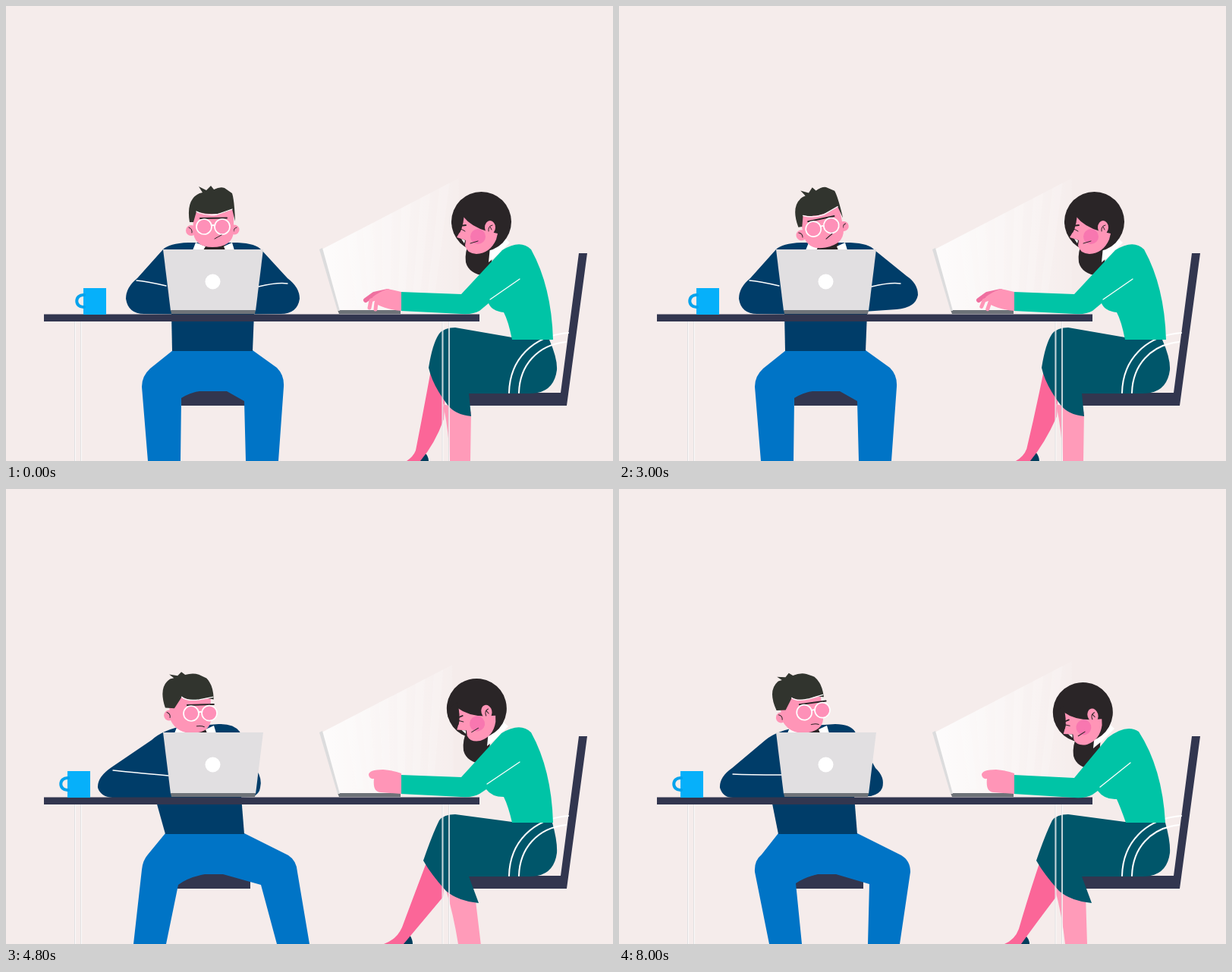
Write an HTML page that moves like this. It is 800 px wide and 600 px high and loops after 8.08 s.

```html
<!DOCTYPE html>
<html lang="en">
<head>
<meta charset="utf-8">
<title>Two people at a desk</title>
<style>
html, body { margin: 0; width: 100%; height: 100%; overflow: hidden; background: #f5eceb; }
svg { display: block; width: 100vw; height: 100vh; }
.line { fill: none; stroke-linecap: round; stroke-linejoin: round; }
.white { stroke: #fff; }
.ink { stroke: #2a2527; }
.wood { fill: #32364f; }
.navy { fill: #003d69; }
.skin { fill: #ff95b7; }
.green { fill: #00c4a6; }
.hair { fill: #2a2527; }
.metal { fill: #6e7379; }
</style>
</head>
<body>
<svg viewBox="0 0 800 600">
  <defs>
    <linearGradient id="glow" gradientUnits="userSpaceOnUse" x1="416" y1="0" x2="600" y2="0">
      <stop offset="0" stop-color="#fff" stop-opacity=".85"/>
      <stop offset=".45" stop-color="#fff" stop-opacity=".5"/>
      <stop offset="1" stop-color="#fff" stop-opacity=".08"/>
    </linearGradient>
  </defs>

  <!-- man -->
  <path id="stool" class="wood"/>
  <path id="trousers" fill="#0074c6"/>
  <path id="waist" class="navy"/>
  <path id="manLeft" class="navy"/>
  <path id="manRight" class="navy"/>
  <path id="cuffLeft" class="line white" stroke-width="1.3"/>
  <path id="cuffRight" class="line white" stroke-width="1.3"/>
  <g id="manCollar">
    <path class="hair" d="M258 312H289V322H258Z"/>
    <path fill="#fff" d="M250 312L263 317L260 322H246ZM298 312L287 317L289 322H301Z"/>
  </g>
  <g id="manHead">
    <g id="earRight"><circle class="skin" cx="301" cy="295" r="6.5"/>
      <path class="line ink" d="M300 297Q300 293 304 292"/></g>
    <path id="manFace" class="skin"/>
    <circle class="skin" cx="244" cy="296" r="7"/>
    <path class="line ink" d="M245 299Q246 294 241 292"/>
    <path id="manHair" fill="#31342e"/>
    <path id="fringe" class="line white" stroke-width="1.3"/>
    <g id="features" class="line">
      <path class="ink" stroke-width="2" d="M256 280L291 279.500"/>
      <circle class="white" fill="#fe90b8" stroke-width="1.7" cx="261" cy="291" r="10"/>
      <circle class="white" fill="#fe90b8" stroke-width="1.7" cx="285" cy="291" r="10"/>
      <path class="white" stroke-width="1.700" d="M271 290Q273 288 275 290"/>
      <path id="manMouth" class="ink" stroke-width="1"/>
    </g>
  </g>

  <!-- screen glow -->
  <path id="beam" fill="url(#glow)"/>
  <g id="streaks" fill="#fff" opacity=".18"></g>

  <!-- woman -->
  <g id="chair" class="wood"><path d="M755 326H766L739 527H610V510H731Z"/></g>
  <path id="shoe" fill="#003d5c"/>
  <path id="farLeg" fill="#fb6698"/>
  <path id="nearLeg" fill="#ff9bb9"/>
  <path id="skirt" fill="#00566a"/>
  <g id="arms" class="line white" stroke-width="2">
    <path d="M663 510C664 466 694 435 741 431M676 510C677 474 700 447 738 443"/>
  </g>
  <path id="ponytail" class="hair" d="M612 308Q604 324 606 338Q610 353 631 356L640 340L642 310Z"/>
  <path id="neck" fill="#fff" d="M636 338L638 318L654 303L664 312L648 328Z"/>
  <g id="womanHead">
    <circle class="hair" cx="626.500" cy="284.500" r="39.500"/>
    <path class="skin" d="M602 277Q613 291 634 297L648 300L646 308Q638 326 620 327Q607 326 605 316L606 309L594 305L600 295Z"/>
    <path class="hair" d="M604 270Q604 287 598 299Q590 297 587 286Q589 273 604 270Z"/>
    <ellipse class="skin" cx="638" cy="292" rx="7" ry="9"/>
    <path class="line ink" d="M636 297Q635 290 641 289M638 291L640 295"/>
    <circle cx="622" cy="304" r="10" fill="#f877b0"/>
    <path class="line ink" stroke-width="1.8" d="M598 290L606 289"/>
    <path class="line ink" d="M598 293L605 297M612 313L622 310"/>
    <path fill="#fff" d="M600 307L605 309L604 313Z"/>
  </g>

  <!-- desk -->
  <path class="line" stroke="#fff" stroke-width="2" d="M91 416V600M99 416V600M575.500 416V600M584 416V600" opacity=".75"/>
  <path class="line" stroke="#c9cccd" stroke-width=".8" d="M90.500 416V600M98.500 416V600M575 416V600M583.500 416V600" opacity=".7"/>
  <path id="desk" class="wood" d="M50 406.500H624V416H50Z"/>
  <g id="mug">
    <path fill="#06b0fa" d="M102 372H132V407H102Z"/>
    <path class="line" stroke="#06a3ec" stroke-width="4" d="M103 381C90 380 90 398 103 397"/>
  </g>
  <g id="manLaptop">
    <path fill="#e1dfe1" d="M207 321H339L329 402H217Z"/>
    <path class="metal" d="M217 401H329L328 406H218Z"/>
    <circle cx="272.500" cy="363.500" r="10" fill="#fff"/>
  </g>
  <path class="metal" d="M437 401H520V406H439Z"/>
  <path id="lid" fill="#dcdcdd"/>

  <path id="sweater" class="green"/>
  <path id="seam" class="line white" stroke-width="1.3"/>
  <g id="typingHand">
    <path class="line" stroke="#ef70a0" stroke-width="6" d="M503 376L485 380L474 388"/>
    <path class="skin" d="M521 377L503 373Q490 378 483 384L490 394Q502 400 521 402Z"/>
    <path id="fingers" class="line" stroke="#ff95b7" stroke-width="5"/>
  </g>
  <path id="fist" class="skin" d="M521 375Q510 371 497 370Q478 370 478 377Q479 383 485 382Q483 400 494 400L521 402Z"/>
</svg>

<script>
const LOOP = 8080;
const $ = id => document.getElementById(id);

// Moments of the resting poses.
const TYPE = 3120, SLAM = 3760, HOLD = 3920, PUSH = 4800, LEAN = 6200, REST = 7080;

// Each track: [time, value] pairs; numbers inside the strings are eased.
const paths = {
  stool: [[TYPE, 'M231 508L322 508L322 527L231 527Z'], [SLAM, 'M226 508L322 508L322 527L226 527Z'],
    [PUSH, 'M226 508L322 508L322 527L226 527Z'], [LEAN, 'M233 508L322 508L322 527L233 527Z']],
  trousers: [
    [TYPE, 'M220 454L325 454L357 477Q367 487 366 502L359 600L316 600L314 521L291 508L255 508Q242 510 231 517L230 600L187 600L179 502Q179 488 190 478Z'],
    [SLAM, 'M213 454L320 454L365 482Q376 490 376 505L380 600L338 600L327 521L286 508L262 508Q240 512 228 522L214 600L171 600L179 502Q179 490 187 482Z'],
    [HOLD, 'M213 454L320 454L365 482Q376 490 376 505L380 600L338 600L327 521L286 508L262 508Q240 512 228 522L214 600L171 600L179 502Q179 490 187 482Z'],
    [PUSH, 'M210 454L314 454L372 483Q383 490 384 505L400 600L357 600L336 522L286 508L262 508Q240 512 227 522L211 600L168 600L179 502Q180 490 187 482Z'],
    [LEAN, 'M210 454L314 454L372 483Q384 490 384 505L370 600L328 600L330 521L286 508L262 508Q245 512 233 520L241 600L198 600L179 505Q178 490 188 482Z']],
  waist: [[TYPE, 'M218 405L219 455L325 455L327 405Z'], [SLAM, 'M202 405L213 455L319 455L313 405Z'],
    [HOLD, 'M202 405L213 455L319 455L313 405Z'], [PUSH, 'M196 405L210 455L314 455L310 405Z'],
    [LEAN, 'M200 405L210 455L314 455L310 405Z']],
  manLeft: [
    [TYPE, 'M275 312L240 312Q215 313 207 321L173 359Q158 371 158 386Q161 406 182 406L275 407Z'],
    [SLAM, 'M265 312L240 312Q208 317 192 330L149 367Q131 384 132 400Q135 408 150 408L275 408Z'],
    [HOLD, 'M265 312L240 312Q208 317 192 330L149 367Q131 384 132 400Q135 408 150 408L275 408Z'],
    [PUSH, 'M265 311L240 311Q207 317 192 331L139 367Q120 380 121 394Q125 406 140 407L275 407Z'],
    [LEAN, 'M265 312L240 313Q207 319 193 331L149 368Q132 380 133 394Q137 407 150 407L275 407Z']],
  manRight: [
    [TYPE, 'M265 312L305 312Q330 313 337 322L371 359Q387 371 387 386Q384 406 362 406L265 407Z'],
    [SLAM, 'M255 312L285 310Q310 309 322 320L360 343Q372 350 371 364Q367 378 330 391L265 407Z'],
    [HOLD, 'M255 312L285 310Q310 309 322 320L360 343Q372 350 371 364Q367 378 330 391L265 407Z'],
    [PUSH, 'M255 312L280 310Q300 309 308 320L330 370Q338 382 335 394Q334 402 325 406L265 407Z'],
    [LEAN, 'M255 312L285 310Q305 310 311 320L338 368Q351 380 347 394Q344 402 332 405L265 407Z']],
  cuffLeft: [[TYPE, 'M172 362Q185 363 211 369'], [SLAM, 'M135 377Q160 376 215 377'], [HOLD, 'M135 377Q160 376 215 377'],
    [PUSH, 'M141 371Q160 373 214 378'], [LEAN, 'M150 376Q170 377 214 377']],
  cuffRight: [[TYPE, 'M333 370Q358 364 371 366'], [SLAM, 'M336 346Q348 343 358 349'],
    [HOLD, 'M336 346Q348 343 358 349'], [PUSH, 'M310 369Q316 366 320 369']],
  manFace: [[TYPE, 'M246 262L300 262L300 298Q298 318 272 318Q250 318 247 300Z'],
    [SLAM, 'M242 262L299 262L299 300Q299 319 276 320Q254 320 246 303Z']],
  manHair: [
    [TYPE, 'M242 285Q237 255 255 247L259 246L254 238L264 243L270 237L274 242Q282 238 288 240L298 247Q301 256 302 284L298 268Q276 279 251 271L247 285Z'],
    [SLAM, 'M239 286Q230 258 246 248L251 247L245 242L256 244L261 239L266 243Q276 240 284 243L294 248Q303 257 303 276L293 274Q276 280 261 272L251 287Z']],
  fringe: [[TYPE, 'M251 271Q263 277 278 275L298 268'], [SLAM, 'M261 272Q267 278 284 276L302 273']],
  manMouth: [[TYPE, 'M275 307Q280 304 284 302'], [SLAM, 'M268 308Q274 307 278 309']],
  beam: [[TYPE, 'M416 321L597 227L597 380L520 402L438 402Z'], [SLAM, 'M424 318L575 258L575 385L520 402L438 402Z'],
    [HOLD, 'M424 318L575 258L575 385L520 402L438 402Z'], [PUSH - 300, 'M416 321L588 232L590 380L520 402L438 402Z'],
    [PUSH, 'M416 321L588 232L590 380L520 402L438 402Z'], [5300, 'M416 321L597 227L597 380L520 402L438 402Z']],
  lid: [[TYPE, 'M413 321L417 319L440 402L437 402Z'], [SLAM, 'M422 319L426 317L440 402L437 402Z'],
    [HOLD, 'M422 319L426 317L440 402L437 402Z'], [4400, 'M413 321L417 319L440 402L437 402Z']],
  shoe: [[TYPE, 'M542 600L552 589Q557 594 557 600Z'], [SLAM, 'M530 600L542 591Q545 595 545 600Z'],
    [HOLD, 'M530 600L542 591Q545 595 545 600Z'], [PUSH, 'M518 600L532 588Q536 594 536 600Z'],
    [LEAN, 'M525 600L537 590Q541 595 541 600Z']],
  farLeg: [[TYPE, 'M560 480L578 520L577 545Q565 578 546 600L528 600Q537 594 540 586Q550 535 560 480Z'],
    [SLAM, 'M557 485L578 520L578 538Q550 575 535 600L513 600Q524 594 528 582Q540 535 557 485Z'],
    [HOLD, 'M557 485L578 520L578 538Q550 575 535 600L513 600Q524 594 528 582Q540 535 557 485Z'],
    [PUSH, 'M557 485L578 520L576 538Q545 575 524 600L498 600Q515 594 522 578Q538 535 557 485Z'],
    [LEAN, 'M557 485L578 520L576 538Q548 575 530 600L508 600Q522 594 527 580Q540 535 557 485Z']],
  nearLeg: [[TYPE, 'M576 525L613 535L612 600L585 600Q584 562 576 525Z'],
    [SLAM, 'M579 525L618 535L625 600L594 600Q590 562 579 525Z'],
    [LEAN, 'M579 525L618 535L627 600L599 600Q590 562 579 525Z'],
    [REST, 'M574 525L615 535L617 600L588 600Q584 562 574 525Z']],
  skirt: [[TYPE, 'M571 432Q578 424 592 424L667 437L716 440Q727 465 726 480Q722 511 690 511L610 511L613 541Q592 539 582 526Q562 500 557 477Q562 445 571 432Z'],
    [SLAM, 'M571 437Q577 429 592 429L667 439L720 440Q727 465 726 480Q722 511 690 511L610 511L623 546Q595 543 580 530Q560 508 550 490Q562 455 571 437Z']],
  sweater: [
    [TYPE, 'M520 377L600 380L654 322Q678 307 692 321Q719 370 721 440L667 440Q662 415 656 404Q640 402 636 392L624 402Q616 407 600 406L520 402Z'],
    [SLAM, 'M520 377L600 381L641 328Q669 308 685 320Q716 368 720 440L668 440Q661 420 656 409Q640 410 631 398L624 403Q616 408 600 407L520 402Z'],
    [HOLD, 'M520 377L600 381L641 328Q669 308 685 320Q716 368 720 440L668 440Q661 420 656 409Q640 410 631 398L624 403Q616 408 600 407L520 402Z'],
    [PUSH, 'M520 377L600 380L653 322Q678 307 692 321Q719 370 721 440L667 440Q662 418 656 406Q640 406 633 396L624 402Q616 407 600 406L520 402Z'],
    [LEAN, 'M520 377L600 381L644 328Q669 309 685 320Q716 368 720 440L668 440Q661 420 656 409Q640 410 631 398L624 403Q616 408 600 407L520 402Z']],
  seam: [[TYPE, 'M677 360L638 387'], [SLAM, 'M674 361L634 393'], [HOLD, 'M674 361L634 393'],
    [PUSH, 'M677 360L634 389'], [LEAN, 'M674 361L634 393']]
};

const moves = {
  manCollar: [[TYPE, 'translate(0 0)'], [SLAM, 'translate(-28 0)'], [PUSH, 'translate(-24 0)']],
  manHead: [[520, 'translate(0 0) rotate(0 272 291)'], [1680, 'translate(-2 0) rotate(-2 272 291)'],
    [3000, 'translate(-5 1) rotate(-11 272 291)'], [SLAM, 'translate(-32 5) rotate(-9 272 291)'],
    [HOLD, 'translate(-32 5) rotate(-9 272 291)'], [PUSH, 'translate(-29 2) rotate(-1 272 291)'],
    [LEAN, 'translate(-21 1) rotate(1 272 291)'], [REST, 'translate(-31 2) rotate(-7 272 291)']],
  features: [[TYPE, 'translate(0 0)'], [SLAM, 'translate(9 1)'], [HOLD, 'translate(9 1)'],
    [PUSH, 'translate(12 3)'], [REST, 'translate(14 2)']],
  earRight: [[TYPE, 'translate(0 0)'], [3500, 'translate(-18 0)']],
  chair: [[3400, 'rotate(0 739 527)'], [SLAM, 'rotate(-1.6 739 527)'], [HOLD, 'rotate(-1.6 739 527)'], [4400, 'rotate(0 739 527)']],
  desk: [[3400, 'translate(0 0)'], [SLAM, 'translate(0 1.5)'], [HOLD, 'translate(0 1.5)'], [4400, 'translate(0 0)']],
  manLaptop: [[3400, 'translate(0 0)'], [SLAM, 'translate(.5 -.8)'], [HOLD, 'translate(.5 -.8)'], [4400, 'translate(0 0)']],
  mug: [[4080, 'translate(0 0)'], [4720, 'translate(-21 0)']],
  womanHead: [[TYPE, 'translate(0 0) rotate(0 626 285)'], [SLAM, 'translate(-15 10) rotate(-16 626 285)'],
    [HOLD, 'translate(-15 10) rotate(-16 626 285)'], [PUSH, 'translate(-6 5) rotate(-15 626 285)'],
    [LEAN, 'translate(-20 18) rotate(-28 626 285)'], [REST, 'translate(-15 10) rotate(-16 626 285)']],
  ponytail: [[TYPE, 'translate(0 0)'], [SLAM, 'translate(-9 14)'], [HOLD, 'translate(-9 14)'],
    [PUSH, 'translate(-3 7)'], [LEAN, 'translate(-6 15)'], [REST, 'translate(-7 14)']],
  neck: [[TYPE, 'translate(0 0)'], [SLAM, 'translate(-11 4)'], [HOLD, 'translate(-11 4)'],
    [PUSH, 'translate(-2 1)'], [LEAN, 'translate(-13 6)'], [REST, 'translate(-11 4)']]
};
moves.arms = moves.chair;

// Where typing and foot tapping push a shape to.
const pushed = {
  manLeft: 'M275 312L240 312Q215 313 207 321L168 359Q152 368 153 383Q157 402 182 402L275 405Z',
  manRight: 'M265 312L305 312Q330 313 337 322L379 356Q394 366 394 381Q391 398 366 400L265 407Z',
  sweater: paths.sweater[0][1].replace('M520', 'M527').replace('L520', 'L527'),
  farLeg: 'M560 480L578 520L577 535Q552 578 534 600L513 600Q527 594 532 580Q547 535 560 480Z',
  shoe: 'M531 600L544 587Q548 594 548 600Z'
};

const number = /-?\d*\.?\d+/g;
const clamp = x => Math.min(1, Math.max(0, x));
const ramp = (t, a, b) => { const x = clamp((t - a) / (b - a)); return x * x * (3 - 2 * x); };

function mix(a, b, k) {
  const end = b.match(number);
  let i = 0;
  return a.replace(number, n => (+n + (end[i++] - n) * k).toFixed(2));
}

function sample(keys, t) {
  const i = keys.findIndex(k => k[0] > t);
  if (i === 0) return keys[0][1];
  if (i < 0) return keys[keys.length - 1][1];
  const [t0, a] = keys[i - 1], [t1, b] = keys[i];
  return mix(a, b, ramp(t, t0, t1));
}

const streaks = [.18, .3, .44, .58, .72, .86].map(x => {
  const el = document.createElementNS('http://www.w3.org/2000/svg', 'path');
  $('streaks').append(el);
  return { el, x };
});

function drawStreaks(beam) {
  const [x0, y0, x1, y1] = beam.match(number).map(Number);
  const top = k => `${x0 + (x1 - x0) * k} ${y0 + (y1 - y0) * k}`;
  for (const { el, x } of streaks) {
    const foot = 438 + 135 * x;
    el.setAttribute('d', `M${top(x)}L${top(x + .07)}L${foot + 9} 395L${foot} 395Z`);
  }
}

function draw(t) {
  const busy = ramp(t, 520, 640) * (1 - ramp(t, 3020, 3120));
  const beat = Math.cos((t - 1680) / 377 * 2 * Math.PI);
  const left = busy * Math.max(0, beat);
  const right = busy * Math.max(0, -beat);
  const tap = busy * (1 + Math.cos((t - 1680) / 574 * 2 * Math.PI)) / 2;
  const push = { manLeft: left, manRight: right, sweater: left, farLeg: tap, shoe: tap };

  for (const id in paths) {
    let d = sample(paths[id], t);
    if (push[id]) d = mix(d, pushed[id], push[id]);
    $(id).setAttribute('d', d);
    if (id === 'beam') drawStreaks(d);
  }
  for (const id in moves) $(id).setAttribute('transform', sample(moves[id], t));

  $('typingHand').setAttribute('transform', `translate(${8 * left} 0)`);
  $('fingers').setAttribute('d', mix(
    'M493 384L481 388L479 398M499 389L488 391L487 400',
    'M493 384L481 389L476 394M499 389L490 391L484 399', left + right * .4));
  const closed = t >= 3440;
  $('typingHand').style.display = closed ? 'none' : '';
  $('fist').style.display = closed ? '' : 'none';
}

const start = performance.now();
function tick() {
  draw((performance.now() - start) % LOOP);
  requestAnimationFrame(tick);
}
tick();
</script>
</body>
</html>
```
